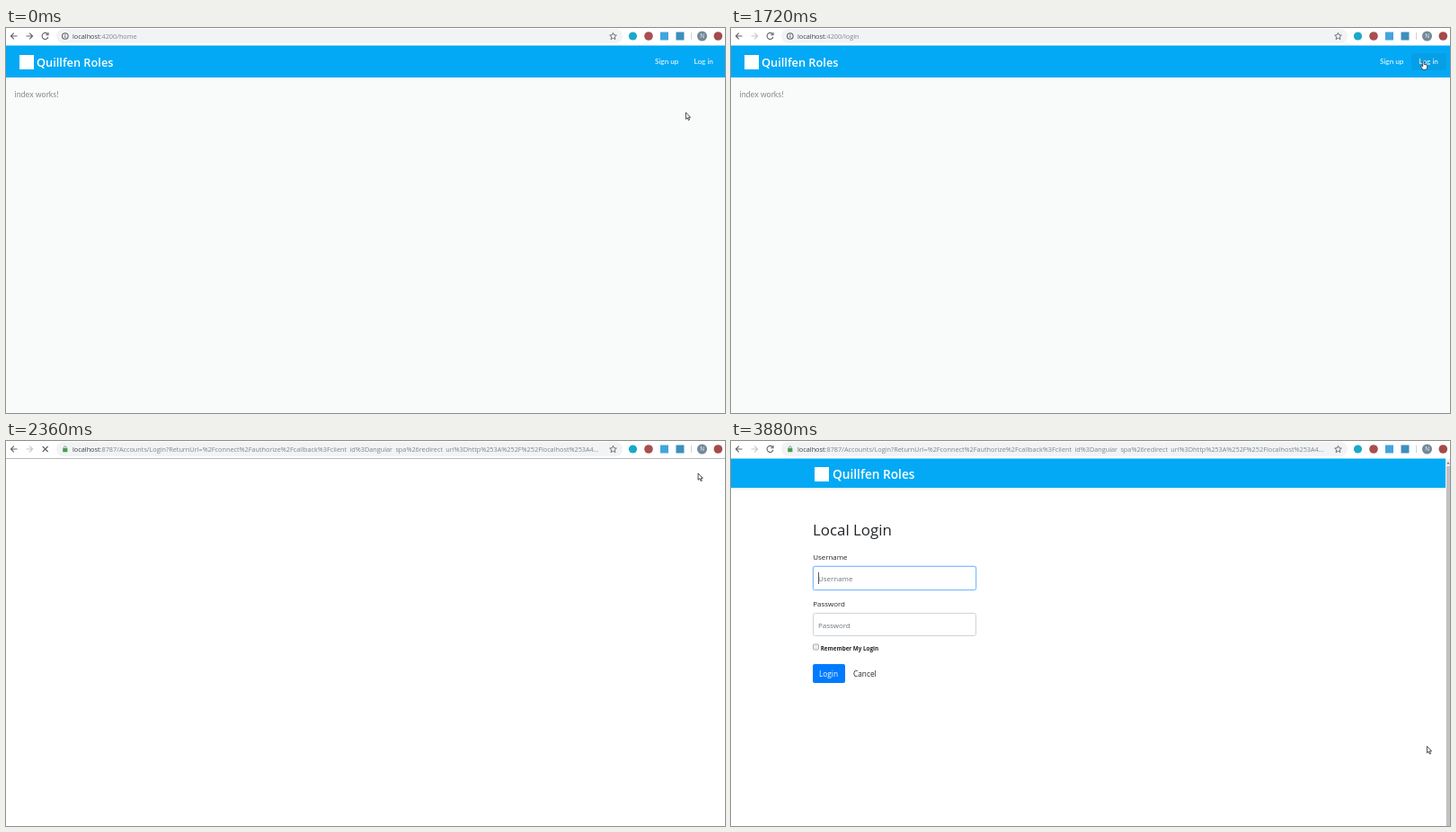
An HTML page that plays this animation: 800x428 px, repeating every 4040 ms.

```html
<!DOCTYPE html>
<html lang="en">
<head>
<meta charset="utf-8">
<title>Login flow</title>
<style>
html, body { margin: 0; width: 100%; height: 100%; overflow: hidden; background: #fff; }
svg { display: block; width: 100vw; height: 100vh; font-family: "Open Sans", "Noto Sans", sans-serif; }
text { white-space: pre; }
.url { font-size: 7.3px; word-spacing: 1.4px; fill: #80868b; }
.url tspan { fill: #3c4043; }
.icon { fill: none; stroke: #5f6368; stroke-width: 1.1; }
.nav { font: 8.2px Lato, sans-serif; fill: #fff; }
.brand { font-weight: 600; fill: #fff; }
.form { font-size: 7.95px; fill: #212529; }
.form .hint { fill: #6c757d; }
.form .button { font-size: 8.3px; }
.field { fill: #fff; stroke: #ced4da; }
</style>
</head>
<body>
<svg viewBox="0 0 800 428">
  <rect width="800" height="428" fill="#fff"/>

  <g id="home">
    <rect y="19" width="800" height="409" fill="#f9fbfb"/>
    <rect y="19.5" width="800" height="35.5" fill="#03a9f4"/>
    <rect x="15" y="30" width="16" height="16" fill="#fff"/>
    <text class="brand" x="34" y="43" font-size="12.8">Quillfen Roles</text>
    <rect id="hover" x="757" y="28" width="39" height="19" rx="2" fill="#069fe6"/>
    <text class="nav" x="722" y="40">Sign up</text>
    <text class="nav" x="765.5" y="40">Log in</text>
    <text id="index" x="9.5" y="77" fill="#85898c" style="font: 8.9px Lato, sans-serif">index works!</text>
    <path id="spinner" d="M5.2-8.2A9.7 9.7 0 1 1-2.5-9.4" fill="none" stroke="#ffab40" stroke-width="2.2"/>
  </g>

  <g id="login" class="form">
    <rect y="52" width="795" height="1" fill="#e9f0f4"/>
    <rect y="53" width="795" height="2" fill="#f8fafb"/>
    <rect y="19.5" width="795" height="32.5" fill="#03a9f4"/>
    <rect x="93" y="29" width="16" height="16" fill="#fff"/>
    <text class="brand" x="113" y="42" font-size="13.7">Quillfen Roles</text>
    <rect x="795" y="20" width="5" height="408" fill="#f1f1f1"/>
    <rect x="796" y="28" width="4" height="400" fill="#c1c1c1"/>
    <path d="M796.3 25.5l1.7-2.2 1.7 2.2z" fill="#666"/>
    <text x="91" y="105" font-size="16.9" font-weight="500">Local Login</text>
    <text x="91.2" y="132">Username</text>
    <rect x="90.5" y="138.5" width="183" height="28" rx="3" fill="#bfdeff"/>
    <rect class="field" x="91.5" y="139.5" width="181" height="26" rx="2" style="stroke:#80bdff"/>
    <text class="hint" x="97" y="155.8">Username</text>
    <rect id="caret" x="97" y="146" width="1" height="13" fill="#555"/>
    <text x="91.2" y="184">Password</text>
    <rect class="field" x="91.5" y="191.5" width="181" height="25" rx="2"/>
    <text class="hint" x="97" y="207.6">Password</text>
    <rect x="91.5" y="226" width="6" height="6" rx="1" fill="#eee" stroke="#999" stroke-width=".8"/>
    <text x="99.7" y="232.8" font-size="6.3" font-weight="700" style="font-size:6.3px">Remember My Login</text>
    <rect x="91" y="248" width="36" height="21" rx="2" fill="#007bff"/>
    <text class="button" x="98" y="262" fill="#fff">Login</text>
    <text class="button" x="136" y="262">Cancel</text>
  </g>

  <g id="toolbar">
    <rect width="800" height="19" fill="#fff"/>
    <rect id="edge" y="19" width="800" height="1" fill="#b6b8ba"/>
    <rect x="56" y="1" width="630" height="16" rx="8" fill="#f1f3f4"/>
    <path class="icon" d="M12.5 9H5.5M8.8 5.6L5.4 9l3.4 3.4"/>
    <path id="forward" class="icon" d="M22.5 9h7M26.2 5.6L29.6 9l-3.4 3.4"/>
    <path id="reload" class="icon" d="M46.2 6.6A3.5 3.5 0 1 0 46.9 10M47 5v2.8h-2.8"/>
    <path id="stop" class="icon" d="M40.7 6l6 6M46.7 6l-6 6"/>
    <g id="info" class="icon"><circle cx="65.8" cy="9" r="3.3"/><path d="M65.8 8.5v2.3M65.8 6.8v.9"/></g>
    <g id="lock"><rect x="63.2" y="8" width="5.2" height="4.2" rx=".5" fill="#4b9b54"/>
      <path d="M64.4 8.2V7.3a1.4 1.4 0 0 1 2.8 0v.9" fill="none" stroke="#4b9b54" stroke-width=".8"/></g>
    <text class="url" x="74" y="11.8"><tspan>localhost</tspan><tspan id="path" style="fill:inherit"></tspan></text>
    <path class="icon" style="stroke-width:.9" d="M675.5 5.3l1.1 2.5 2.7.3-2 1.8.6 2.7-2.4-1.4-2.4 1.4.6-2.7-2-1.8 2.7-.3z"/>
    <circle cx="697.5" cy="9" r="4.6" fill="#1aa9c9"/>
    <circle cx="715" cy="9" r="4.8" fill="#a8504f"/>
    <rect x="728" y="4.5" width="9" height="9" fill="#42a5db"/>
    <rect x="745.5" y="4.5" width="9" height="9" fill="#3d8fbd"/>
    <rect x="762" y="5" width="1" height="8" fill="#d0d3d6"/>
    <circle cx="774.5" cy="9" r="5.5" fill="#738899"/>
    <text x="774.5" y="11.3" font-size="6.3" fill="#fff" text-anchor="middle">N</text>
    <circle cx="792.3" cy="9" r="4.8" fill="#a44a48"/>
  </g>

  <path id="arrow" d="M.4.4v7.4l1.7-1.6 1.3 2.8 1.2-.5-1.2-2.7h2.2z" fill="#fff" stroke="#222" stroke-width=".8"/>
  <path id="hand" d="M-.8.9Q0-.4.8.9V3.4l2.3.5q1 .3 1 1.3v1.7L3.2 9.3H-.7L-2.7 6.3q-.5-1.4.7-1.2L-.8 6z" fill="#fff" stroke="#222" stroke-width=".7"/>
</svg>
<script>
const LOOP = 4040;
const $ = id => document.getElementById(id);
const show = (id, on) => $(id).setAttribute("visibility", on ? "visible" : "hidden");
const place = (id, x, y, turn = 0) =>
  $(id).setAttribute("transform", `translate(${x} ${y}) rotate(${turn})`);

// Pointer positions: start time, x, y
const pointer = [
  [0, 756, 93.5], [320, 760.5, 74], [470, 765.5, 65], [630, 769, 56], [780, 769.7, 49],
  [930, 769.7, 44], [1090, 770.5, 36], [1240, 770.5, 37], [1410, 767, 30], [1560, 770.5, 37],
  [2210, 769.7, 35.5], [2660, 769.7, 45], [2790, 760, 71], [2940, 747, 126], [3090, 746, 129],
  [3250, 733, 188], [3720, 757, 293], [3880, 774, 339]
];
const authPath = ":8787/Accounts/Login?ReturnUrl=%2Fconnect%2Fauthorize%2Fcallback%3Fclient id" +
  "%3Dangular spa%26redirect uri%3Dhttp%253A%252F%252Flocalhost%253A4...";

function draw(t) {
  const between = (a, b) => t >= a && t < b;
  const leaving = t >= 1720, away = t >= 2210, ready = t >= 2660;

  show("home", !away);
  show("login", ready);
  show("hover", between(1090, 2210));
  show("index", t < 1890);
  show("spinner", between(1890, 2210));
  place("spinner", 400.5, 79.5, t < 2040 ? -90 : 0);
  show("caret", ready && !between(3090, 3570));

  show("edge", away && !ready);
  $("forward").style.stroke = leaving ? "#c4c6c8" : "";
  const loading = between(1890, 2660);
  show("stop", loading);
  show("reload", !loading);
  show("info", !away);
  show("lock", away);
  $("path").textContent = away ? authPath : leaving ? ":4200/login" : ":4200/home";

  const [, x, y] = pointer.findLast(p => p[0] <= t);
  const linking = between(1090, 2210);
  show("arrow", !linking);
  show("hand", linking);
  place("arrow", x, y);
  place("hand", x, y);
}

const start = performance.now();
function tick() {
  draw((performance.now() - start) % LOOP);
  requestAnimationFrame(tick);
}
tick();
</script>
</body>
</html>
```
